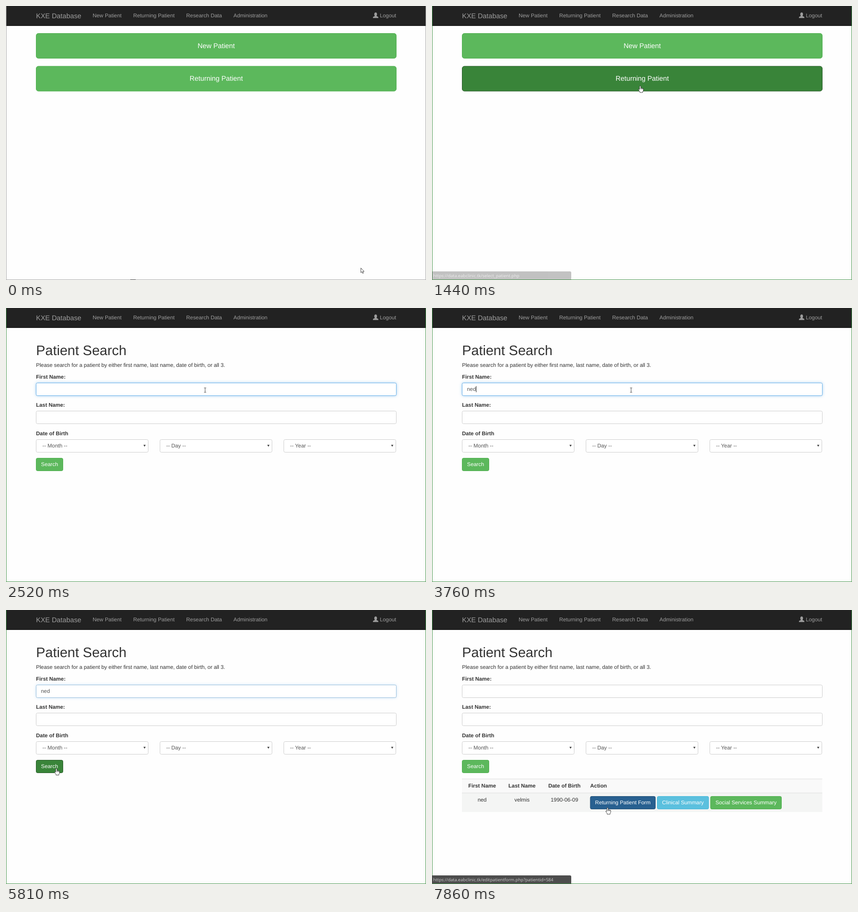
Write an HTML page that moves like this. It is 926 px wide and 605 px high and loops after 7990 ms.

```html
<!DOCTYPE html>
<html lang="en">
<head>
<meta charset="utf-8">
<title>Patient search</title>
<style>
  html, body { margin: 0; height: 100%; overflow: hidden; background: #fefefe; }
  svg { display: block; width: 100vw; height: 100vh; }
  text { font: 11.83px "Liberation Sans", Arial, sans-serif; fill: #333; text-rendering: geometricPrecision; white-space: pre; }
  .glow { filter: drop-shadow(0 0 3.4px rgba(102, 175, 233, .6)); }
  #status text { font: 9.58px "Open Sans", "Noto Sans", sans-serif; fill: #cfcfcf; }
</style>
</head>
<body>
<svg id="stage" viewBox="0 0 926 605"></svg>
<script>
const LOOP = 7990;
const PRESS = 1420, FORM = 1630, FOCUS = 1990, SUBMIT = 5740, RESULTS = 6000;
const KEYS = [3320, 3500, 3720];
const FIRST = 'ned', LAST = 'velmis';
const HOST = 'https://data.eabclinic.tk/';

// Pointer hot spot: time, x, y
const PATH = [
  [0, 782, 578], [30, 782, 578], [400, 620, 402], [800, 476, 246], [1150, 463, 200],
  [1320, 460, 187], [1400, 459, 176], [1870, 459, 176], [1980, 439, 181], [3780, 439, 181],
  [4090, 259, 283], [4730, 147, 330], [4920, 124.5, 344], [5130, 111, 349.5],
  [6290, 111, 349.5], [6580, 183, 390], [6850, 268, 408], [7090, 340, 424],
  [7450, 378, 434], [7800, 387, 436], [LOOP, 387, 436]
];

// Button colours: [fill, border] at rest, hovered, pressed
const GREEN = [['#5cb85c', '#4cae4c'], ['#449d44', '#398439'], ['#398439', '#255625']];
const BLUE = [['#337ab7', '#2e6da4'], ['#286090', '#204d74']];
const CYAN = [['#5bc0de', '#46b8da']];

const clamp = v => Math.max(0, Math.min(1, v));
const ramp = (t, from, to) => clamp((t - from) / (to - from));
const inside = ([x, y], [left, top, w, h]) => x >= left && x <= left + w && y >= top && y <= top + h;

// Text centred vertically on y
function label(x, y, str, { size = 11.83, fill = '#333', anchor = 'start', bold = false, id = '' } = {}) {
  return `<text id="${id}" x="${x}" y="${y + size * .3465}" text-anchor="${anchor}"
    style="font-size:${size}px;fill:${fill};font-weight:${bold ? 700 : 400}">${str}</text>`;
}
const box = (x, y, w, h, attrs) => `<rect x="${x}" y="${y}" width="${w}" height="${h}" ${attrs}/>`;
const frame = (x, y, w, cls = '') =>
  box(x + .5, y + .5, w - 1, 28, `rx="3" fill="#fff" stroke="#ccc" class="${cls}"`);

const buttons = {};
function button(id, [x, y, w, h], str, colors, { size = 11.83, rx = 3, textY = y + h / 2 - .2 } = {}) {
  buttons[id] = { area: [x, y, w, h], colors };
  return box(x + .5, y + .5, w - 1, h - 1, `rx="${rx}" id="${id}"`) +
    label(x + w / 2, textY, str, { size, fill: '#fff', anchor: 'middle' });
}
function select(x, str) {
  return frame(x, 290, 248) + label(x + 14.3, 304.3, str, { fill: '#555' }) +
    `<path d="M${x + 237} 302h5l-2.5 4.6z" fill="#444"/>`;
}

const navItem = (x, str) => label(x, 21.3, str, { fill: '#9d9d9d' });
const nav = box(0, 0, 926, 43.5, 'fill="#222"') + box(0, 43, 926, 1, 'fill="#0c0c0c"') +
  label(66.3, 21.3, 'KXE Database', { size: 15.2, fill: '#9d9d9d' }) +
  navItem(191, 'New Patient') + navItem(280.4, 'Returning Patient') +
  navItem(397.3, 'Research Data') + navItem(501.5, 'Administration') + navItem(824.2, 'Logout') +
  `<g fill="#9d9d9d"><ellipse cx="815" cy="18.2" rx="3" ry="3.9"/>
   <path d="M809 26.4v-1.2q.2-1.6 2.4-2.2 2-.7 2-2h3.2q0 1.3 2 2 2.2.6 2.4 2.2v1.2z"/></g>`;

const big = { size: 15.2, rx: 5 };
const home =
  button('newPatient', [66, 60, 795, 56], 'New Patient', GREEN, { ...big, textY: 87.3 }) +
  button('returning', [66, 132.5, 795, 56], 'Returning Patient', GREEN, { ...big, textY: 159.7 });

const bold = { bold: true };
const form =
  label(66.3, 93.8, 'Patient Search', { size: 30.4 }) +
  label(66.3, 126.4, 'Please search for a patient by either first name, last name, date of birth, or all 3.') +
  label(66.3, 152.2, 'First Name:', bold) + frame(66, 165, 795) +
  `<g id="focus">${box(66.5, 165.5, 794, 28, 'rx="3" fill="#fff" stroke="#66afe9" class="glow"')}</g>` +
  label(77, 179.3, '', { fill: '#555', id: 'typed' }) +
  box(77.5, 172.5, 1, 13.5, 'fill="#222" id="caret"') +
  label(66.3, 214.3, 'Last Name:', bold) + frame(66, 227, 795) +
  label(66.3, 277, 'Date of Birth', bold) +
  select(66, '-- Month --') + select(339, '-- Day --') + select(612, '-- Year --') +
  button('search', [66, 331, 60, 29], 'Search', GREEN);

const mid = { anchor: 'middle' }, head = { anchor: 'middle', bold: true };
const results =
  box(66, 373, 794.5, 31, 'id="headRow"') + box(66, 404, 794.5, 42, 'id="bodyRow"') +
  box(66, 372.5, 794.5, 1, 'fill="#ddd"') + box(66, 403.5, 794.5, 1, 'fill="#ddd"') +
  label(110.5, 388, 'First Name', head) + label(198.5, 388, 'Last Name', head) +
  label(292, 388, 'Date of Birth', head) + label(348.8, 388, 'Action', bold) +
  label(110.5, 419.3, FIRST, mid) + label(198.5, 419.3, LAST, mid) + label(292, 419.3, '1990-06-09', mid) +
  button('openForm', [348.5, 411, 144.5, 29], 'Returning Patient Form', BLUE) +
  button('clinical', [496, 411, 114.5, 29], 'Clinical Summary', CYAN) +
  button('social', [613.5, 411, 157.5, 29], 'Social Services Summary', GREEN);

const pointers = `<g id="pointer" stroke="#222" stroke-width=".85" stroke-linejoin="round" fill="#fff">
  <path id="arrow" d="M.4.5V10.8L2.8 8.6L4.4 12.4L6.1 11.7L4.5 8.1H7.6Z"/>
  <path id="hand" d="M-1.3 8.6V1.2Q0-.5 1.3 1.2V5.2Q2.6 4.4 3.4 5.6Q4.7 4.8 5.4 6.1Q6.9 5.5 7 7.2V10.6L5.6 13.2V15H-.8V13.2L-3.8 9Q-4.2 7.2-2.6 7.6ZM1.3 5.2V8M3.4 5.6V8M5.4 6.1V8"/>
  <path id="beam" fill="none" d="M-2.3-4.7H-.6L0-4.3L.6-4.7H2.3M0-4.3V4.8M-2.3 5.2H-.6L0 4.8L.6 5.2H2.3"/>
</g>`;

document.getElementById('stage').innerHTML =
  box(0, 0, 926, 605, 'fill="#fefefe"') + nav +
  `<g id="home">${home}</g><g id="form">${form}</g><g id="results">${results}</g>
  <path id="edge" d="M.5 0V604.5H925.5V0" fill="none"/>` +
  box(274, 604, 12, 1, 'fill="#333" id="speck"') +
  `<g id="status"><path d="M0 586H304q3 0 3 3V604H0z" fill="#4d4d4d"/>
   <text id="address" x="2.5" y="598.6"></text></g>` + pointers;

const el = id => document.getElementById(id);
const show = (id, on) => el(id).style.display = on ? '' : 'none';

// Monotone cubic through PATH
function pointerAt(t) {
  let i = 0;
  while (i < PATH.length - 2 && t >= PATH[i + 1][0]) i++;
  const a = PATH[i], b = PATH[i + 1], dt = b[0] - a[0], u = (t - a[0]) / dt;
  const slope = (k, axis) => k < 0 || k > PATH.length - 2 ? 0 :
    (PATH[k + 1][axis] - PATH[k][axis]) / (PATH[k + 1][0] - PATH[k][0]);
  const tangent = (k, axis) => {
    const p = slope(k - 1, axis), q = slope(k, axis);
    return p * q <= 0 ? 0 : 2 * p * q / (p + q);
  };
  return [1, 2].map(axis =>
    a[axis] + (b[axis] - a[axis]) * u * u * (3 - 2 * u) +
    dt * u * (1 - u) * (tangent(i, axis) * (1 - u) - tangent(i + 1, axis) * u));
}

const FIELDS = [[66, 165, 795, 29], [66, 227, 795, 29]];
const CELLS = [[168, 381, 61, 14], [256, 381, 72, 14], [181, 412, 35, 14], [262, 412, 61, 14]];

function pointerKind(t, at, hot) {
  if (hot || (t >= FORM && t < 1880)) return 'hand';
  if (t >= FORM && FIELDS.some(r => inside(at, r))) return 'beam';
  if (t >= RESULTS && CELLS.some(r => inside(at, r))) return 'beam';
  return 'arrow';
}

function draw(t) {
  const at = pointerAt(t), isHome = t < FORM, isDone = t >= RESULTS;
  show('home', isHome);
  show('form', !isHome);
  show('results', isDone);

  let hot = '';
  const reachable = isHome ? ['newPatient', 'returning'] :
    isDone ? ['search', 'openForm', 'clinical', 'social'] : ['search'];
  for (const id in buttons) {
    const { area, colors } = buttons[id];
    const over = reachable.includes(id) && inside(at, area);
    if (over) hot = id;
    const pressed = over && ((id === 'returning' && t >= PRESS) ||
      (id === 'search' && t >= SUBMIT && t < 5840));
    const [fill, stroke] = colors[pressed ? 2 : over ? 1 : 0];
    el(id).setAttribute('fill', fill);
    el(id).setAttribute('stroke', stroke);
  }

  const overRow = (top, h) => isDone && inside(at, [66, top, 795, h]);
  el('headRow').setAttribute('fill', overRow(373, 31) ? '#f4f5f4' : '#f9f9f9');
  el('bodyRow').setAttribute('fill', overRow(404, 42) ? '#f4f5f4' : '#fefefe');

  const focus = ramp(t, FOCUS, FOCUS + 150) * (1 - ramp(t, SUBMIT, SUBMIT + 150));
  el('focus').style.opacity = isDone ? 0 : focus * focus * (3 - 2 * focus);
  const count = KEYS.filter(k => t >= k).length;
  el('typed').textContent = isDone ? '' : FIRST.slice(0, count);
  const blinkStart = count ? KEYS[count - 1] : FOCUS;
  show('caret', t >= FOCUS && t < SUBMIT && Math.floor((t - blinkStart) / 530) % 2 === 0);
  el('caret').setAttribute('x', 77.2 + count * 6.58);

  el('edge').setAttribute('stroke', t < PRESS ? '#a3a3a3' : '#3f9145');
  show('speck', t < PRESS);
  el('status').style.opacity = t < 3000 ?
    ramp(t, 1400, 1520) * (1 - ramp(t, 1930, 2130)) : ramp(t, 7240, 7360);
  el('address').textContent = HOST +
    (t < 3000 ? 'select_patient.php' : 'editpatientform.php?patientid=584');

  const kind = pointerKind(t, at, hot);
  ['arrow', 'hand', 'beam'].forEach(k => show(k, k === kind));
  el('pointer').setAttribute('transform', `translate(${at.map(v => v.toFixed(2))})`);
}

const start = performance.now();
function tick() {
  draw((performance.now() - start) % LOOP);
  requestAnimationFrame(tick);
}
tick();
</script>
</body>
</html>
```
